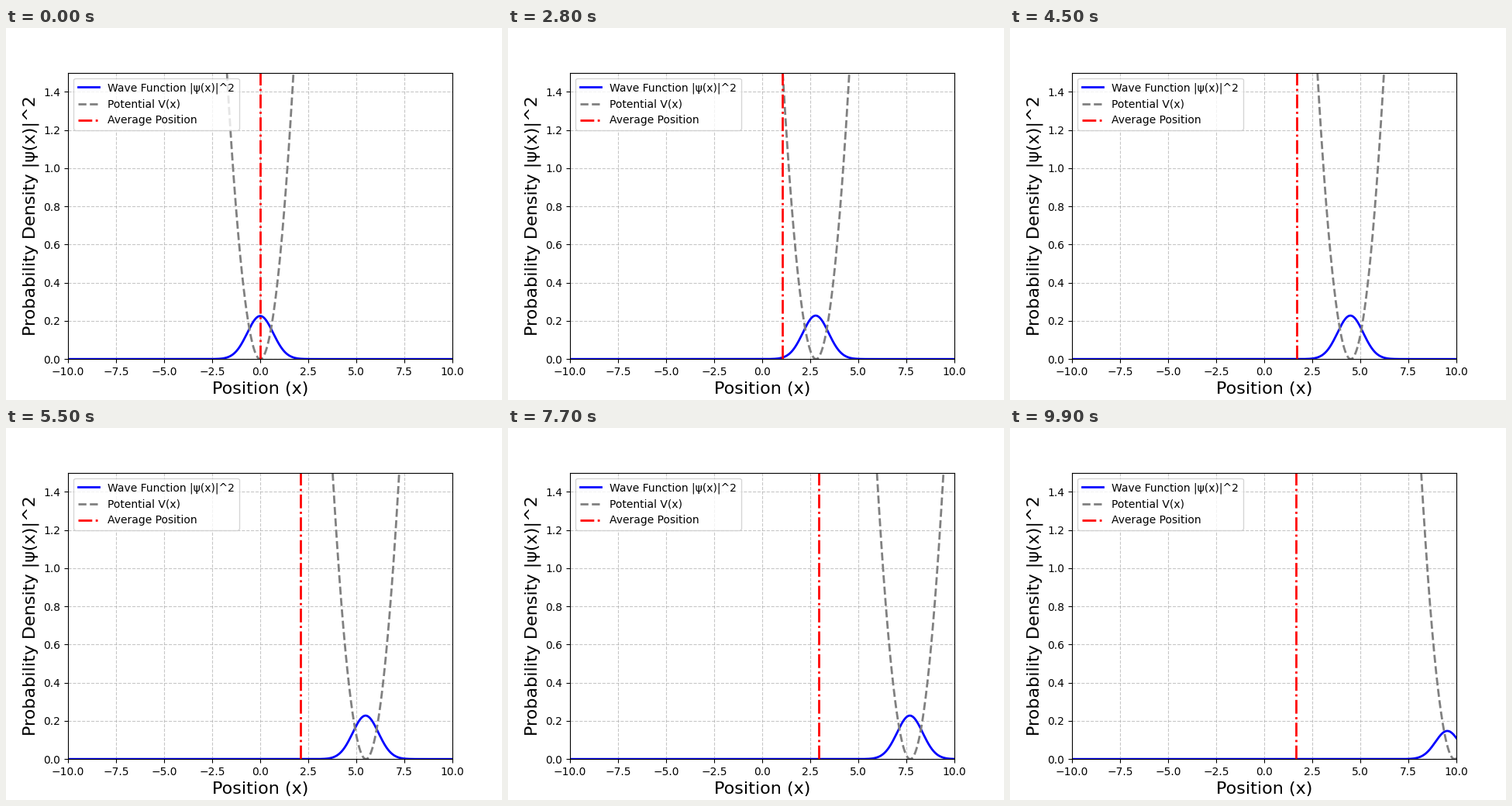
Animation of 640 by 480 pixels, one loop 10000 ms. Source, as a matplotlib script:

```python
import numpy as np
import matplotlib.pyplot as plt
from matplotlib.animation import FuncAnimation

FRAMES = 100
INTERVAL = 100      # ms
SPEED = 0.1         # trap displacement per frame
STEPS = 2           # relaxation steps per frame
TAU = 1.0           # imaginary time step

x = np.linspace(-10, 10, 2000)
dx = x[1] - x[0]
k = 2 * np.pi * np.fft.fftfreq(x.size, dx)
kinetic = np.exp(-0.5 * TAU * k**2)


def potential(center):
    return 0.5 * (x - center)**2


def relax(psi, center):
    """One normalised split-operator step in imaginary time."""
    half = np.exp(-0.5 * TAU * potential(center))
    psi = psi / np.sqrt(np.sum(psi**2) * dx)
    return half * np.fft.ifft(kinetic * np.fft.fft(half * psi)).real


def densities():
    psi = np.exp(-x**2 / 4)
    for i in range(FRAMES):
        for _ in range(STEPS):
            psi = relax(psi, i * SPEED)
        yield psi**2


density = list(densities())

fig, ax = plt.subplots(figsize=(6.4, 4.8), dpi=100)
ax.set_xlim(-10, 10)
ax.set_ylim(0, 1.5)
ax.set_xlabel("Position (x)", fontsize=16)
ax.set_ylabel("Probability Density |ψ(x)|^2", fontsize=16)
ax.grid(True, linestyle="--", alpha=0.7)

wave, = ax.plot(x, density[0], "b-", lw=2, label="Wave Function |ψ(x)|^2")
trap, = ax.plot(x, potential(0), "--", color="gray", lw=2,
                label="Potential V(x)")
mean = ax.axvline(0, color="r", linestyle="-.", lw=2,
                  label="Average Position")
ax.legend(loc="upper left")


def update(i):
    wave.set_ydata(density[i])
    trap.set_ydata(potential(i * SPEED))
    avg = np.sum(x * density[i]) * dx
    mean.set_xdata([avg, avg])
    return wave, trap, mean


anim = FuncAnimation(fig, update, frames=FRAMES, interval=INTERVAL,
                     repeat=True, repeat_delay=0)
plt.show()
```
